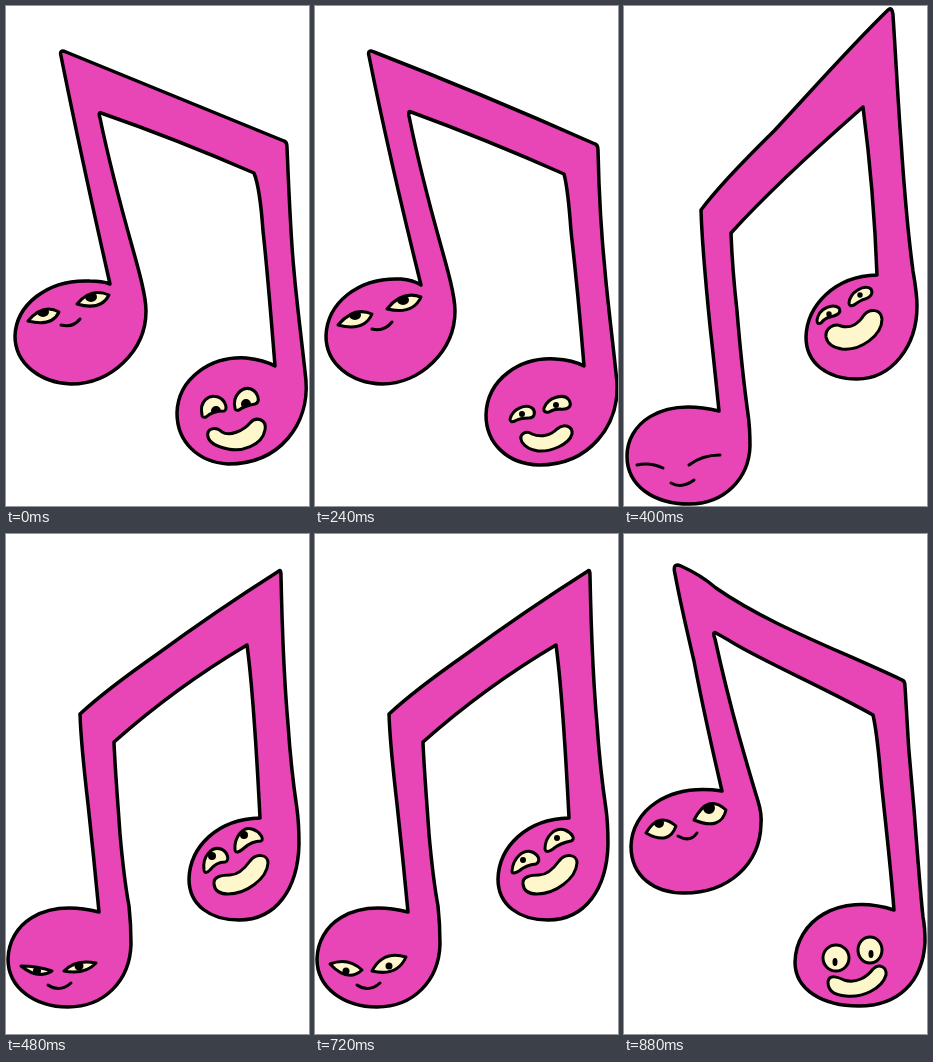
Animation of 303 by 500 pixels, one loop 0.96 s. Source, as an HTML page with a canvas:

```html
<!DOCTYPE html>
<html lang="en">
<head>
<meta charset="utf-8">
<title>Dancing notes</title>
<style>
html, body { margin: 0; width: 100%; height: 100%; overflow: hidden; background: #fff; }
canvas { display: block; }
</style>
</head>
<body>
<canvas id="stage" width="303" height="500"></canvas>
<script>
const ctx = document.getElementById('stage').getContext('2d');
const PINK = '#e846b6', CREAM = '#fff7cc', INK = '#000';
const STEP = 80;

const oval = (x, y, rx, ry = rx) =>
  `M${x - rx},${y}a${rx},${ry} 0 1 0 ${2 * rx},0a${rx},${ry} 0 1 0 ${-2 * rx},0Z`;

// Almond eye: left corner, upper control, right corner, lower control
const almond = (x1, y1, ux, uy, x2, y2, lx, ly) =>
  `M${x1},${y1}Q${ux},${uy} ${x2},${y2}Q${lx},${ly} ${x1},${y1}Z`;

const bodies = {
  tilt: `M55,50Q53,43 60,46L278,135Q281,136 281,141C283,190 285,235 288,265C291,300 297,345 300,375
    C303,417 275,458 222,458C192,456 171,436 171,407C172,372 205,350 240,352Q258,354 269,360
    C265,310 261,260 257,225Q254,182 248,167Q170,133 95,107Q92,106 94,112Q105,165 126,240
    C133,265 140,290 140,305C140,345 105,378 65,378C35,377 9,358 9,330C10,300 40,273 84,275Q96,275 104,278Q75,150 55,50Z`,
  tiltSoft: `M54,50Q52,43 59,46Q165,87 280,138Q283,139 283,144C284,190 287,235 290,265C293,300 299,345 302,377
    C304,419 275,459 224,459C192,458 171,437 171,409C172,373 205,351 240,353Q258,354 269,360
    C265,310 260,260 256,225Q253,183 249,168Q170,133 96,106Q93,104 94,110Q105,165 126,240
    C133,265 140,290 140,305C140,345 105,378 67,378C36,377 11,358 11,330C12,298 42,271 86,273Q98,274 106,279Q74,150 54,50Z`,
  rise: `M77,204Q97,177 150,125C190,82 225,42 264,4Q268,0 269,9C272,55 274,95 277,135C280,180 284,228 289,265
    C292,282 293,290 293,300C293,340 268,373 233,373C203,373 182,357 182,331C183,300 210,270 253,269
    C251,215 246,155 239,101C190,144 145,185 107,227C108,255 110,278 113,305Q118,365 124,408Q126,422 126,440
    C125,472 101,498 65,498C30,498 3,480 3,450C3,420 34,390 95,405Q91,365 86,320Q78,240 77,204Z`,
  lean: `M74,180Q100,156 150,121Q210,77 273,37Q275,35 275,42C276,90 278,145 282,190Q285,235 291,275Q293,290 293,310
    C292,355 270,386 233,386C204,386 183,371 183,345C184,313 211,285 254,284C251,225 247,155 241,111
    Q170,153 108,208C109,235 112,270 114,300Q118,345 123,372Q125,390 125,410C124,447 98,473 62,473
    C29,473 2,454 2,425C3,391 35,364 93,378Q88,325 82,270Q75,210 74,180Z`,
  drop: `M51,40Q48,28 57,32Q77,41 92,54C145,91 215,116 278,146Q281,147 281,152C283,195 286,235 290,275C293,315 296,355 299,383
    Q301,393 301,408C299,448 274,472 235,472C199,472 171,456 171,428C172,387 214,358 270,376
    C266,325 261,285 257,245Q253,198 249,181C205,156 145,130 111,110Q96,101 92,99Q88,97 91,105Q102,155 115,202
    Q126,241 134,267Q138,280 137,290C136,330 105,359 60,359C31,359 7,343 7,312C8,277 43,249 98,257Q80,180 70,127Q57,72 51,40Z`
};

const grin = `M208,350C207,342 217,341 224,341C232,341 239,334 244,327C250,319 262,320 262,329
  C261,345 240,360 222,360Q209,360 208,350Z`;

// Shapes are cream; pupils are ovals clipped to them; lines are mouths and lids
const poses = [
  {
    body: 'tilt',
    shapes: [
      almond(22, 315, 37, 297, 53, 306, 46, 321), almond(71, 298, 85, 281, 103, 289, 95, 305),
      'M196,409C193,395 203,388 212,391C220,394 222,404 218,405Q206,405 200,411Q196,412 196,409Z',
      'M229,402C226,390 236,380 245,383C252,386 255,396 249,398Q238,400 233,404Q229,405 229,402Z',
      `M202,431C200,422 210,420 216,426C224,431 238,424 244,417C250,410 261,413 259,424
       C256,440 235,446 222,443C212,441 204,438 202,431Z`
    ],
    pupils: [[37, 306, 6, 5], [85, 291, 6, 5], [210, 405, 5], [240, 398, 5]],
    lines: 'M55,319Q67,322 74,313'
  },
  {
    body: 'tiltSoft',
    shapes: [
      almond(23, 319, 39, 300, 57, 308, 49, 326), almond(72, 303, 87, 284, 106, 291, 98, 309),
      'M195,413C198,402 211,398 217,402C221,405 220,412 214,412Q205,412 200,415Q195,417 195,413Z',
      'M229,402C233,391 249,387 254,394C258,401 252,404 245,403Q239,403 234,406Q228,407 229,402Z',
      `M207,436C203,428 211,424 217,428C226,432 236,429 242,423C249,417 258,420 257,428
       C254,439 235,446 223,445Q211,443 207,436Z`
    ],
    pupils: [[40, 309, 6, 5], [88, 294, 6, 5], [207, 408, 3], [241, 399, 3]],
    lines: 'M57,323Q69,326 77,316'
  },
  {
    body: 'rise',
    shapes: [
      almond(11, 415, 25, 392, 43, 412, 29, 431), almond(53, 412, 69, 380, 89, 404, 74, 424),
      almond(11, 443, 25, 424, 41, 443, 27, 464), almond(56, 436, 71, 415, 91, 432, 76, 452),
      `M217,351C216,342 224,339 235,338C246,337 252,327 259,323C266,320 271,326 268,336
       C263,352 243,363 229,362Q218,360 217,351Z`,
      oval(208, 317, 11), oval(241, 297, 11.5), oval(215, 341, 10), oval(253, 318, 9.5)
    ],
    pupils: [[26, 409, 2, 6], [70, 403, 2, 7], [25, 440, 2, 6], [73, 431, 2, 6],
      [207, 317, 2.7], [241, 296, 2.7], [215, 341, 2.7], [253, 318, 2.7]],
    lines: 'M38,453Q47,459 58,453M36,464Q47,471 60,463'
  },
  {
    body: 'rise',
    shapes: [
      'M193,314C195,302 209,297 215,302C218,307 212,310 206,311Q201,312 197,317Q193,319 193,314Z',
      'M225,297C226,286 240,278 247,283C250,289 245,292 238,294Q234,296 230,299Q225,301 225,297Z',
      `M202,331C201,322 210,317 217,320C227,323 235,317 240,309C246,302 257,303 258,313
       C258,330 236,345 218,343Q204,341 202,331Z`
    ],
    pupils: [[205, 308, 2.7], [236, 289, 2.7]],
    lines: 'M13,459Q26,456 39,462M65,459Q78,449 96,449M47,477Q58,483 70,474'
  },
  {
    body: 'lean',
    shapes: [
      almond(15, 432, 31, 432, 46, 437, 32, 446), almond(58, 437, 70, 425, 90, 429, 79, 441),
      'M198,336C196,322 206,312 215,315C222,318 224,327 219,328Q210,328 204,336Q199,341 198,336Z',
      'M229,316C228,303 237,292 246,295C253,297 259,305 255,307Q246,307 238,314Q230,321 229,316Z',
      grin
    ],
    pupils: [[31, 437, 4], [73, 432, 4.5], [206, 322, 4], [238, 301, 4]],
    lines: 'M42,451Q54,459 65,449'
  },
  {
    body: 'lean',
    shapes: [
      almond(15, 430, 33, 423, 47, 436, 33, 449), almond(57, 437, 68, 416, 91, 423, 82, 443),
      'M197,337C198,324 208,315 217,318C224,321 226,327 221,330Q211,331 204,337Q197,341 197,337Z',
      'M230,315C230,302 240,293 250,296C257,299 261,305 256,307Q245,309 238,315Q231,320 230,315Z',
      grin
    ],
    pupils: [[31, 437, 3.5], [74, 432, 3.5], [208, 326, 3], [242, 304, 3]],
    lines: 'M42,451Q54,459 65,449'
  },
  {
    body: 'drop',
    shapes: [
      almond(22, 299, 35, 277, 52, 292, 45, 312), almond(70, 286, 84, 259, 102, 276, 97, 297),
      oval(212, 424, 13), oval(246, 416, 12, 13),
      `M204,448C205,440 214,443 220,446C232,450 243,443 249,435C255,429 263,433 262,441
       C258,455 238,464 222,462Q204,461 204,448Z`
    ],
    pupils: [[35, 289, 5], [85, 274, 6], [211, 428, 2.5, 4], [247, 420, 2.5, 4]],
    lines: 'M54,302Q66,309 73,299'
  }
];

// Pose shown at each step of the loop
const steps = [0, 0, 1, 1, 2, 3, 4, 4, 5, 5, 6, 6];

function fill(path, color) {
  ctx.fillStyle = color;
  ctx.fill(path);
}

function drawPose({ body, shapes, pupils, lines }) {
  ctx.fillStyle = '#fff';
  ctx.fillRect(0, 0, 303, 500);
  ctx.strokeStyle = INK;
  ctx.lineJoin = ctx.lineCap = 'round';

  const outline = new Path2D(bodies[body]);
  ctx.lineWidth = 3.5;
  fill(outline, PINK);
  ctx.stroke(outline);

  ctx.lineWidth = 3;
  const dots = new Path2D(pupils.map(p => oval(...p)).join(''));
  for (const d of shapes) {
    const shape = new Path2D(d);
    fill(shape, CREAM);
    ctx.save();
    ctx.clip(shape);
    fill(dots, INK);
    ctx.restore();
    ctx.stroke(shape);
  }
  ctx.stroke(new Path2D(lines));
}

function tick() {
  drawPose(poses[steps[Math.floor(performance.now() / STEP) % steps.length]]);
  requestAnimationFrame(tick);
}
tick();
</script>
</body>
</html>
```
